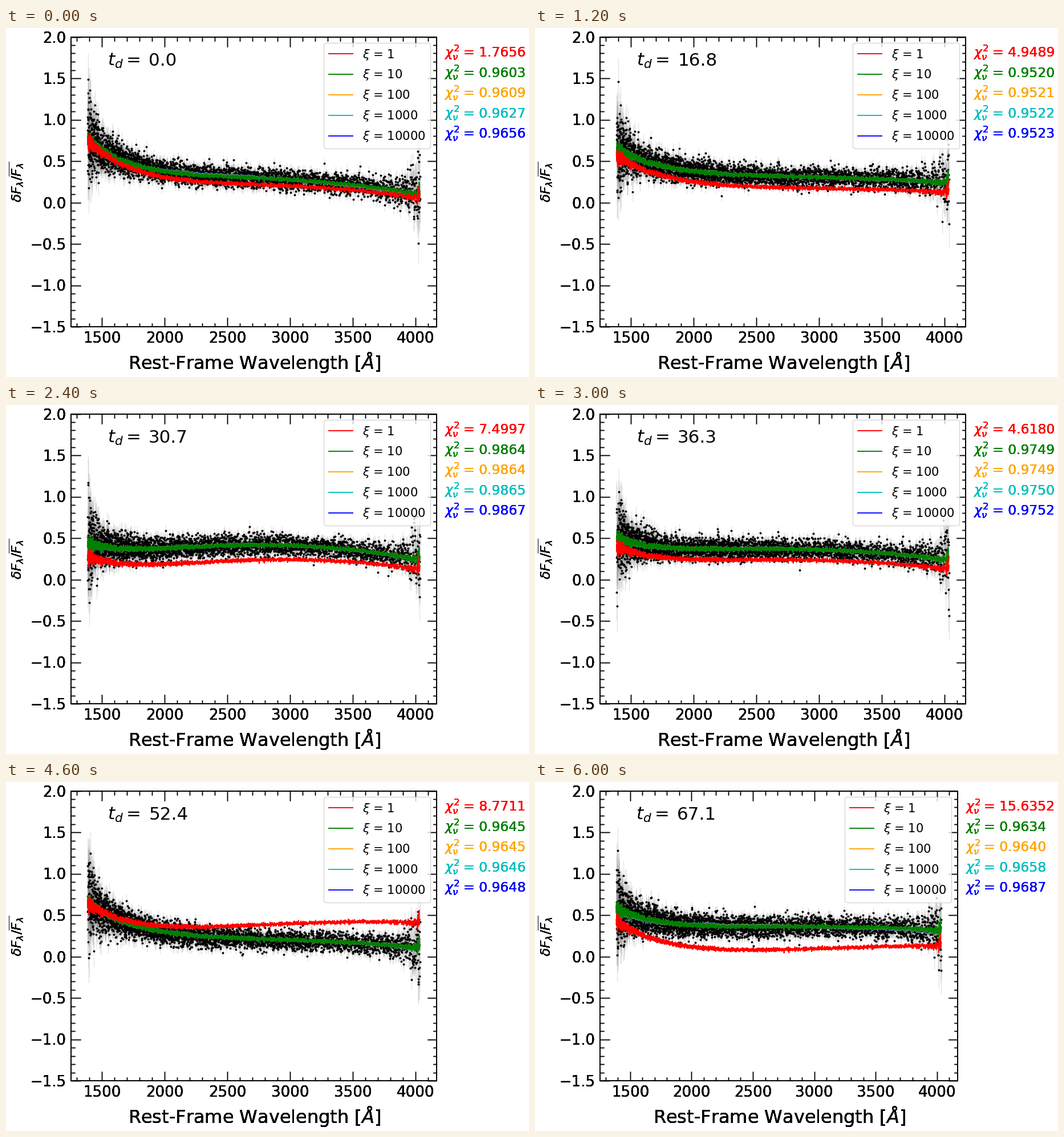
These frames come from a looping animation (917x611 px, 6.2 s). A matplotlib script:

```python
import numpy as np
import matplotlib.pyplot as plt
from matplotlib.animation import FuncAnimation
from matplotlib.ticker import MultipleLocator

W, H, DPI = 917, 611, 100
FRAMES, STEP = 31, 200
LEFT, TOP, BOTTOM = 114, 15.5, 523
COLORS = ["red", "green", "orange", "c", "b"]
plt.rcParams["font.family"] = "DejaVu Sans"

# Key poses: step, day, chi2 of xi=1 and xi=10,
# best fit at four wavelengths, offset of xi=1 at blue end, middle, red end.
POSES = np.array([
    [0, 0.0, 1.7656, .9603, .77, .44, .275, .105, -.02, -.08, -.045],
    [3, 8.9, 3.9888, .9849, .52, .345, .20, .17, -.10, -.14, .07],
    [8, 22.1, 5.6676, .9301, .74, .48, .375, .29, -.08, -.13, -.24],
    [12, 30.7, 7.4997, .9864, .44, .37, .41, .25, -.16, -.19, -.12],
    [18, 41.9, 2.5643, .9634, .57, .40, .31, .235, -.05, -.075, -.10],
    [23, 52.4, 8.7711, .9645, .66, .36, .20, .11, -.02, .12, .30],
    [30, 67.1, 15.6352, .9634, .58, .41, .36, .32, -.15, -.28, -.19]])
# Signed misfit of xi=1, so that it passes through zero when the line crosses over.
PULL = np.sign(POSES[:, 9]) * np.sqrt(POSES[:, 2] - POSES[:, 3])

wave = np.geomspace(1387, 4036, 3600)
blue_end, red_end = wave - wave[0], wave[-1] - wave
sigma = (.063 + .085 * np.exp(-blue_end / 230) + .19 * np.exp(-blue_end / 45)
         + .06 * np.exp(-red_end / 150) + .17 * np.exp(-red_end / 40))
ripple = .18 * sigma * np.random.default_rng(7).normal(size=wave.size)


def px(size):
    return size * 72 / DPI


def pose(n):
    return [np.interp(n, POSES[:, 0], col) for col in POSES.T]


def curve(knots, values):
    """Polynomial in log wavelength through a few points."""
    coef = np.polyfit(np.log(np.array(knots) / 2370), values, len(knots) - 1)
    return np.polyval(coef, np.log(wave / 2370))


def note(ax, text, xy, dx, size, color="black"):
    return ax.annotate(text, xy, (px(dx), 0), xycoords="axes fraction",
                       textcoords="offset points", fontsize=px(size),
                       color=color, va="baseline", annotation_clip=False)


def decorate(ax):
    """Frame, ticks, labels and the chi-square column; returns its numbers."""
    ax.set(xlim=(1254.5, 4168.5), ylim=(-1.5, 2))
    ax.xaxis.set_major_locator(MultipleLocator(500))
    ax.xaxis.set_minor_locator(MultipleLocator(100))
    ax.yaxis.set_major_locator(MultipleLocator(.5))
    ax.yaxis.set_minor_locator(MultipleLocator(.1))
    ax.tick_params(which="both", direction="in", top=True, right=True, width=px(1.2))
    ax.tick_params(which="major", length=px(16.5), labelsize=px(26), pad=6)
    ax.tick_params(which="minor", length=px(6.5))
    for spine in ax.spines.values():
        spine.set_linewidth(px(2))
    ax.set_xlabel(r"Rest-Frame Wavelength [$\AA$]", fontsize=px(32), va="baseline")
    ax.xaxis.set_label_coords(.502, (BOTTOM - 597) / (BOTTOM - TOP))
    fig.text(28 / W, 1 - 269 / H, r"$\delta F_\lambda/\overline{F_\lambda}$",
             fontsize=px(23.4), rotation=90, rotation_mode="anchor",
             ha="center", va="baseline")
    numbers = []
    for i, color in enumerate(COLORS):
        spot = (1, .932 - .07 * i)
        note(ax, r"$\chi^2_\nu$", spot, 13, 23.5, color)
        numbers.append(note(ax, "", spot, 46.5, 23.5, color))
    return numbers


fig = plt.figure(figsize=(W / DPI, H / DPI), dpi=DPI, facecolor="white")
# Stacked copies of the axes, one per model, give the labels their heavy edges.
layers = [fig.add_axes([0, 0, 1, 1], label=f"layer {c}") for c in COLORS]
for layer in layers[1:]:
    layer.patch.set_visible(False)
columns = [decorate(layer) for layer in layers]

ax = layers[-1]
bars = ax.vlines(wave, 0, 0, color="gray", alpha=.2, lw=px(1.4), zorder=1)
dots, = ax.plot([], [], "o", color="black", ms=2.8, mew=0, zorder=2)
lines = [ax.plot([], [], color=c, lw=1.35, zorder=3 - .1 * i,
                 label=rf"$\xi$ = {10 ** i}")[0] for i, c in enumerate(COLORS)]
ax.legend(loc="upper right", fontsize=px(21.2), framealpha=.8, labelspacing=.56)
note(ax, r"$t_d =$", (.1, .901), 0, 31)
day = note(ax, "", (.1, .901), 72, 31)


def draw(n):
    _, days, _, best, *points = pose(n)
    base = curve([1390, 1800, 3000, 4000], points[:4])
    gap = curve([1390, 2360, 4000], points[4:])

    # Misfit grows with xi, mostly at both ends of the series.
    drift = .0003 + .005 * (2 * n / (FRAMES - 1) - 1) ** 20
    chi = best + drift * (np.arange(5) - 1) ** 2 / 9
    chi[0] = best + np.interp(n, POSES[:, 0], PULL) ** 2

    lines[0].set_data(wave, base + gap + ripple)
    for line, misfit in zip(lines[1:], chi[1:] - best):
        bend = .15 * np.sqrt(misfit) * np.cos(7 * np.log(wave / 2370))
        line.set_data(wave, base + bend + ripple)

    flux = base + sigma * np.random.default_rng(100 + n).normal(size=wave.size)
    dots.set_data(wave, flux)
    bars.set_segments(np.stack([np.column_stack([wave, flux - sigma]),
                                np.column_stack([wave, flux + sigma])], axis=1))

    day.set_text(f"{days:.1f}")
    # A two-digit chi-square needs a narrower plot.
    right = 741 if chi[0] >= 10 else 755
    for layer, column in zip(layers, columns):
        layer.set_position([LEFT / W, 1 - BOTTOM / H,
                            (right - LEFT) / W, (BOTTOM - TOP) / H])
        for label, value in zip(column, chi):
            label.set_text(f"= {value:.4f}")


anim = FuncAnimation(fig, draw, frames=FRAMES, init_func=lambda: draw(0),
                     interval=STEP, repeat=True, repeat_delay=0)
plt.show()
```
